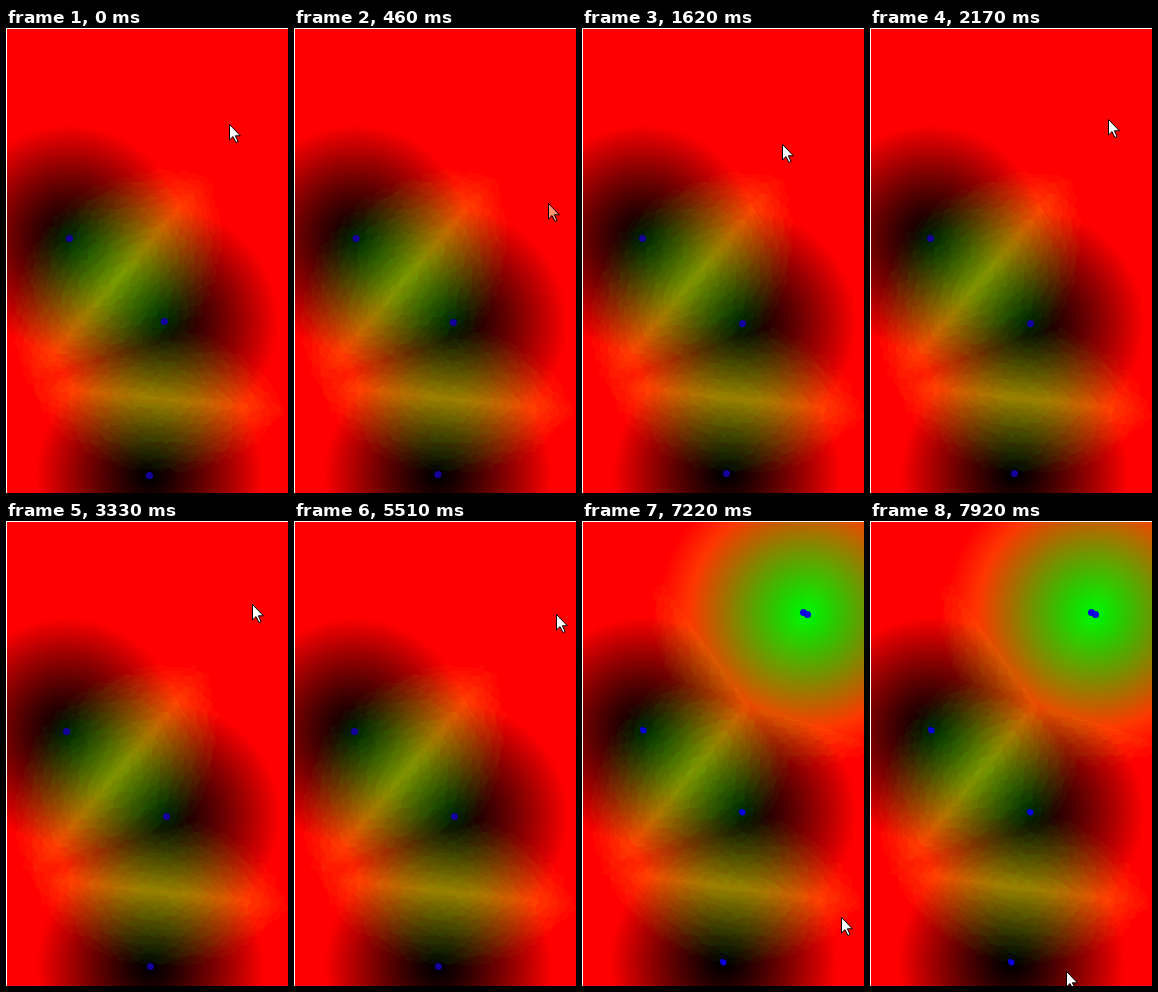
An HTML page with a canvas for the animation above (8 s loop, 282 px wide and 465 px high).

```html
<!DOCTYPE html>
<html lang="en">
<head>
<meta charset="utf-8">
<title>Distance field</title>
<style>
  html, body { margin: 0; width: 100%; height: 100%; overflow: hidden; background: #f00; }
  canvas { display: block; width: 282px; height: 465px; }
</style>
</head>
<body>
<canvas id="stage" width="282" height="465"></canvas>
<script>
const W = 282, H = 465, LOOP = 8000;
const RED_REACH = 114, GREEN_REACH = 150, CELL = 9, BAND = 9;
const ctx = document.getElementById('stage').getContext('2d');

const before = [[63, 210], [158, 293], [143, 447]];
const after = [[60, 210], [160, 295], [144, 445]];
const placed = [[61, 209], [160, 291], [141, 441], [221, 91], [225, 93]];

// Each move: first and last step time, step count, then a quadratic curve.
const moves = [
  { from: 150, to: 930, steps: 11, path: [[223, 96], [283, 224], [250, 245]] },
  { from: 1010, to: 1780, steps: 11, path: [[250, 245], [162, 105], [222, 107]] },
  { from: 1860, to: 2260, steps: 6, path: [[222, 107], [234, 95], [246, 83]] },
  { from: 5510, to: 5510, steps: 1, path: [[246, 83], [254, 88], [262, 93]] },
  { from: 7220, to: 7380, steps: 3, path: [[286.5, 375.5], [245.2, 406.2], [204, 437]] },
  { from: 7760, to: 7920, steps: 3, path: [[204, 437], [200, 443], [196, 450]] }
];
const arrow = new Path2D('M.5 .5V16L4 12.6l2.9 5.9 2.2-1-2.7-5.7h5z');

const random = (x, y, k) => {
  const v = Math.sin(x * 127.1 + y * 311.7 + k * 74.7) * 43758.5453;
  return v - Math.floor(v);
};

// Every pixel leans towards the seed of its ragged cell.
const cellX = new Float32Array(W * H), cellY = new Float32Array(W * H);
function buildCells() {
  const seeds = new Map();
  const seed = (i, j) => {
    const key = i * 1000 + j;
    if (!seeds.has(key)) {
      seeds.set(key, [(i + random(i, j, 1)) * CELL, (j + random(i, j, 2)) * CELL]);
    }
    return seeds.get(key);
  };
  for (let y = 0; y < H; y++) for (let x = 0; x < W; x++) {
    const ci = Math.floor(x / CELL), cj = Math.floor(y / CELL);
    let best = Infinity, near;
    for (let j = cj - 1; j <= cj + 1; j++) for (let i = ci - 1; i <= ci + 1; i++) {
      const s = seed(i, j), d = (s[0] - x) ** 2 + (s[1] - y) ** 2;
      if (d < best) { best = d; near = s; }
    }
    cellX[y * W + x] = (x + near[0]) / 2;
    cellY[y * W + x] = (y + near[1]) / 2;
  }
}

// Indices and distances of the two points nearest to a place.
function nearestTwo(points, x, y) {
  let a = -1, b = -1, da = Infinity, db = Infinity;
  for (let i = 0; i < points.length; i++) {
    const d = Math.hypot(points[i][0] - x, points[i][1] - y);
    if (d < da) { b = a; db = da; a = i; da = d; }
    else if (d < db) { b = i; db = d; }
  }
  return { a, b, da, db };
}

function renderField(points) {
  const image = new ImageData(W, H), px = image.data;
  for (let y = 0; y < H; y++) for (let x = 0; x < W; x++) {
    const n = y * W + x, o = n * 4;
    const here = nearestTwo(points, x, y);
    const pair = here.a > 2 && here.b > 2;
    const second = pair ? here.db : nearestTwo(points, cellX[n], cellY[n]).db;
    let green = Math.max(0, 255 * (1 - second / GREEN_REACH));
    if (!pair) green = Math.ceil(green / BAND) * BAND;
    const edge = x === 0 || y === 0;
    px[o] = edge ? 255 : 255 * Math.min(1, here.da / RED_REACH) ** 1.25;
    px[o + 1] = edge ? 255 : green;
    px[o + 2] = edge ? 255 : 0;
    px[o + 3] = 255;
  }
  return image;
}

const stepsDone = (move, t) => {
  if (t < move.from) return 0;
  const gap = (move.to - move.from) / (move.steps - 1) || 1;
  return Math.min(move.steps, Math.floor((t - move.from) / gap + 0.01) + 1);
};

function cursorAt(t) {
  if (t >= 5580 && t < 7220) return null;
  const move = moves.filter(m => t >= m.from).pop() || moves[0];
  const u = stepsDone(move, t) / move.steps, v = 1 - u;
  const [p, q, r] = move.path;
  return [0, 1].map(k => Math.round(v * v * p[k] + 2 * u * v * q[k] + u * u * r[k]));
}

const fields = new Map();
function fieldAt(t) {
  const late = t >= 5980;
  const step = Math.min(9, stepsDone(moves[0], t));
  const key = late ? 'placed' : step;
  if (!fields.has(key)) {
    const points = late ? placed : before.map((p, i) =>
      p.map((c, k) => c + (after[i][k] - c) * step / 9));
    fields.set(key, { points, image: renderField(points) });
  }
  return fields.get(key);
}

function disc(x, y, r, fill) {
  ctx.fillStyle = fill;
  ctx.beginPath();
  ctx.arc(x, y, r, 0, Math.PI * 2);
  ctx.fill();
}

function draw(t) {
  const { points, image } = fieldAt(t);
  const late = t >= 5980;
  ctx.putImageData(image, 0, 0);
  points.forEach(([x, y], i) => {
    disc(x + 0.5, y + 0.5, late && i < 3 ? 3 : 3.5, late ? '#0a00dc' : '#14009b');
    if (late && i < 3) disc(x - 1, y - 1, 2, '#0a00dc');
  });
  if (t >= 3180 && t < 3330) disc(246, 83, 12, 'rgba(255,255,0,.5)');
  const tip = cursorAt(t);
  if (!tip) return;
  ctx.save();
  ctx.translate(...tip);
  ctx.fillStyle = t >= 150 && t < 1010 ? '#ff9670' : '#fff';
  ctx.fill(arrow);
  ctx.strokeStyle = '#000';
  ctx.lineWidth = 1;
  ctx.stroke(arrow);
  ctx.restore();
}

buildCells();
[0, 150, 780, 5980].forEach(fieldAt);
const start = performance.now();
function tick() {
  draw((performance.now() - start) % LOOP);
  requestAnimationFrame(tick);
}
tick();
</script>
</body>
</html>
```
